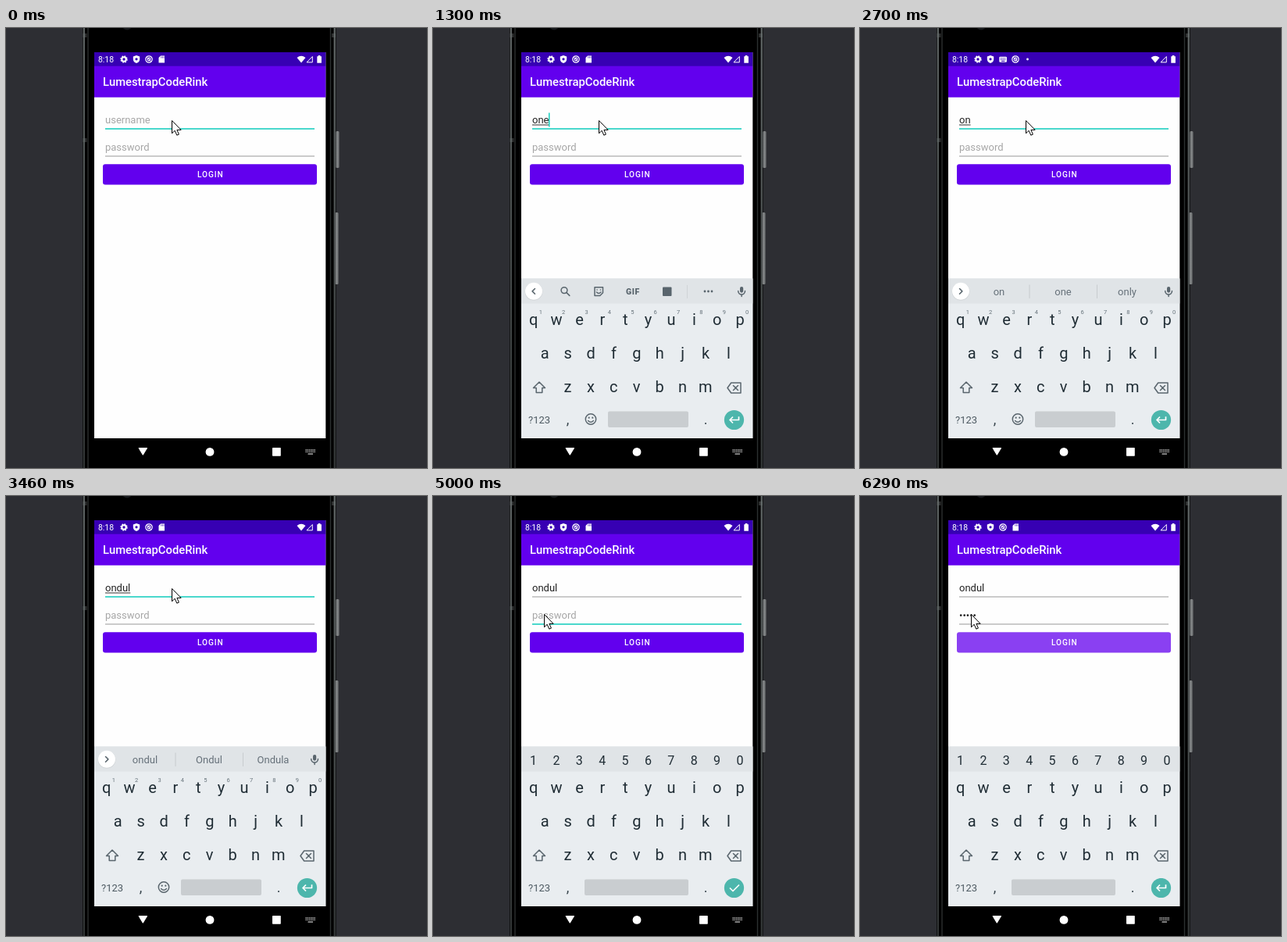
An HTML page that plays this animation: 539x563 px, repeating every 8000 ms.

```html
<!DOCTYPE html>
<html lang="en">
<head>
<meta charset="utf-8">
<title>Login screen</title>
<style>
  html, body { margin: 0; width: 100%; height: 100%; overflow: hidden; background: #2d2e33; }
  svg { display: block; width: 100vw; height: 100vh; }
  text { font-family: Roboto, "Open Sans", sans-serif; white-space: pre; }
  .mid { text-anchor: middle; }
  .field { font-size: 13px; fill: #222; }
  .hint { font-size: 13px; fill: #a6a6a6; }
  .key { font-size: 20px; fill: #202d35; }
  .digit { font-size: 16px; fill: #202d35; }
  .sup { font-size: 7.5px; fill: #66727a; }
  .word { font-size: 13px; fill: #66717a; }
  .line { fill: none; stroke: #59656d; stroke-width: 1.5; stroke-linecap: round; stroke-linejoin: round; }
  .solid { fill: #59656d; }
  .glyph { fill: none; stroke: #fff; stroke-width: 1.7; stroke-linejoin: round; }
</style>
</head>
<body>
<svg viewBox="0 0 539 563" preserveAspectRatio="none">
  <defs>
    <linearGradient id="side">
      <stop offset="0" stop-color="#3c3f41"/><stop offset=".45" stop-color="#8b8e8f"/><stop offset="1" stop-color="#606365"/>
    </linearGradient>
    <linearGradient id="rim" x2="0" y2="1">
      <stop offset="0" stop-color="#626868"/><stop offset=".6" stop-color="#484d4d"/><stop offset="1" stop-color="#343838"/>
    </linearGradient>
    <g id="ring" fill="none" stroke="#fff">
      <circle r="4.2" stroke-width="1.2"/><circle r="1.9" stroke-width="1.1"/><path d="M-2.8-2.8 3 3" stroke-width="1"/>
    </g>
  </defs>

  <!-- Phone body -->
  <rect width="539" height="563" fill="#2d2e33"/>
  <rect x="98" width="324.5" height="563" fill="#000"/>
  <rect x="98.7" width="2.2" height="563" fill="url(#rim)"/>
  <rect x="419.6" width="2.2" height="563" fill="url(#rim)"/>
  <path d="M105 0v563M415.5 0v563" stroke="#2c3030" stroke-width="1.4"/>
  <path d="M98.5 9.5h5M98.5 143.5h5M417 9.5h5" stroke="#686e6e" stroke-width="5" opacity=".45"/>
  <rect x="422" y="132" width="4.7" height="47" rx="1.5" fill="url(#side)"/>
  <rect x="421" y="236" width="4.7" height="92" rx="1.5" fill="url(#side)"/>
  <circle cx="155" cy="-4" r="6.5" fill="#17191c"/>

  <!-- App -->
  <rect x="113" y="31" width="296.3" height="494" fill="#fefefe"/>
  <rect x="113" y="31" width="296.3" height="18" fill="#3700b3"/>
  <rect x="113" y="48.7" width="296.3" height="40" fill="#6200ee"/>
  <g fill="#fff">
    <text x="118" y="44" font-size="10.4">8:18</text>
    <circle cx="151" cy="40" r="2.7" fill="none" stroke="#fff" stroke-width="2"/>
    <circle cx="151" cy="40" r="3.9" fill="none" stroke="#fff" stroke-width="1.6" stroke-dasharray="1.7 1.363"/>
    <path d="M167 35l4.2 1.6V40c0 2.5-1.8 4.3-4.2 5-2.4-.7-4.2-2.5-4.2-5v-3.4z"/>
    <circle cx="167" cy="39.8" r="1.6" fill="#3700b3"/>
    <g id="statusIdle">
      <use href="#ring" x="183" y="40"/>
      <path d="M198 35.5h5v9h-7.5V38z"/><path d="M198.7 36.5v2M200.4 36.5v2M202 36.5v2" stroke="#3700b3" stroke-width=".7"/>
    </g>
    <g id="statusBusy">
      <rect x="178.3" y="36.8" width="9.6" height="7" rx="1"/>
      <path d="M179.8 38.7h7M179.8 40.4h7" stroke="#3700b3" stroke-dasharray="1 .7"/><path d="M181 42.3h4.4" stroke="#3700b3"/>
      <use href="#ring" x="199" y="40"/><circle cx="214.5" cy="40" r="1.4"/>
    </g>
    <path d="M372.5 38Q378 33.5 383.5 38L378 44.5z"/>
    <path d="M392.3 36.5v7.4H385z" fill="none" stroke="#fff"/>
    <path d="M398.3 36.2h1.5V35h2.6v1.2h1.5v8.6h-5.6z"/>
    <text x="124" y="74.3" font-size="14.8" font-weight="500">LumestrapCodeRink</text>
  </g>

  <text class="hint" id="userHint" x="127" y="122">username</text>
  <text class="hint" id="passHint" x="127" y="157">password</text>
  <text class="field" id="userText" x="127" y="122"></text>
  <text class="field" id="passText" x="127" y="157"></text>
  <rect id="compose" x="127" y="123.5" height="1" fill="#333"/>
  <rect id="userLine" x="127" width="268"/>
  <rect id="passLine" x="127" width="268"/>
  <rect id="caret" width="1.5" height="18" fill="#18cdbd"/>
  <rect id="button" x="124" y="174.2" width="274" height="26.4" rx="3"/>
  <text x="245" y="191.1" font-size="10.1" font-weight="500" letter-spacing=".9" fill="#fff">LOGIN</text>

  <!-- Keyboard -->
  <g id="board">
    <rect x="113" y="320.5" width="296.3" height="204.5" fill="#e9edf0"/>
    <rect x="113" y="320.5" width="296.3" height="32" fill="#e0e4e7"/>
    <g id="letters"></g>
    <g id="sups"></g>
    <g id="digits"></g>
    <path class="line" d="M136 453l-7.5 7.5h3.7v6h7.6v-6h3.7z"/>
    <path class="line" d="M381.7 454H394v13h-12.3l-4.7-6.5zM384.5 457.5l6 6m0-6l-6 6"/>
    <text x="122" y="506" font-size="13" fill="#4c5961">?123</text>
    <text class="mid" x="172.5" y="507" font-size="18" fill="#37444c">,</text>
    <text class="mid" x="349" y="507" font-size="18" fill="#37444c">.</text>
    <rect id="space" y="490.5" height="20.5" rx="2" fill="#c9cdd0"/>
    <g id="emoji">
      <circle class="line" cx="202" cy="500.5" r="6.7"/>
      <circle class="solid" cx="199.7" cy="498.7" r="1.1"/><circle class="solid" cx="204.3" cy="498.7" r="1.1"/>
      <path class="line" d="M198.6 502.5q3.4 3.6 6.8 0"/>
    </g>
    <circle cx="385.5" cy="501.5" r="12.6" fill="#4db6ac"/>
    <path id="enter" class="glyph" d="M391.5 497.3v4.2h-11.5m4-4l-4 4 4 4"/>
    <path id="check" class="glyph" d="M380 501.5l4 4 8-8"/>

    <g id="bar">
      <circle cx="129" cy="337.3" r="11.3" fill="#ccd0d3"/><circle cx="129" cy="336.8" r="11" fill="#fff"/>
      <path id="chevron" class="line"/>
      <rect class="solid" x="393" y="331" width="4.2" height="7.7" rx="2.1"/>
      <path class="line" d="M390.7 336.6a4.4 4.4 0 0 0 8.8 0M395.1 341.2v2.3" stroke-linecap="butt"/>
    </g>
    <g id="tools">
      <circle class="line" cx="168" cy="335.6" r="3.9"/><path class="line" d="M171 338.6l3.8 3.8"/>
      <path class="line" d="M207 331.8h10.5v7l-3.7 3.7H207z"/>
      <path class="line" d="M209.5 338q2.7 2.8 5.4 0M210 335h.1M214.4 335h.1"/>
      <text class="mid solid" x="256" y="341" font-size="10.5" font-weight="900" letter-spacing=".6">GIF</text>
      <rect class="solid" x="294" y="331.5" width="11.5" height="11.5" rx="1"/>
      <path d="M325.5 329v17" stroke="#d0d4d7"/>
      <g class="solid"><circle cx="348" cy="337" r="1.4"/><circle cx="352.5" cy="337" r="1.4"/><circle cx="357" cy="337" r="1.4"/></g>
    </g>
    <g id="suggest">
      <path d="M217 328.5v17.5M303.5 328.5v17.5" stroke="#c7cbce"/>
      <text class="word mid" x="178" y="342"></text>
      <text class="word mid" x="260" y="342"></text>
      <text class="word mid" x="342" y="342"></text>
    </g>
  </g>

  <!-- Navigation bar -->
  <g fill="#fff">
    <path d="M170 537.5h10.6l-5.3 8.8z" stroke="#fff" stroke-linejoin="round"/>
    <circle cx="261" cy="542.4" r="5.4"/>
    <rect x="341" y="537" width="10.8" height="10.8" rx=".7"/>
    <path d="M383.5 540h12.5M383.5 542.3h12.5" stroke="#c8c8c8" stroke-width="1.3" stroke-dasharray="1.4 .8"/>
    <path d="M386.5 545h6.5" stroke="#c8c8c8" stroke-width="1.3"/>
  </g>
  <path id="pointer" d="M0 0v16.3l3.7-3.5 2.6 5.9 2.6-1.1-2.5-5.7h5.2z" fill="#fff" stroke="#000"/>
</svg>

<script>
const LOOP = 8000;
const el = id => document.getElementById(id);
const show = (id, on) => el(id).setAttribute('display', on ? 'inline' : 'none');
const set = (id, attrs) => Object.entries(attrs).forEach(([k, v]) => el(id).setAttribute(k, v));

function addRow(parent, chars, x, y, cls) {
  [...chars].forEach((char, i) => {
    const text = document.createElementNS('http://www.w3.org/2000/svg', 'text');
    text.setAttribute('class', cls + ' mid');
    text.setAttribute('x', x + i * 29.38);
    text.setAttribute('y', y);
    text.textContent = char;
    el(parent).append(text);
  });
}
addRow('letters', 'qwertyuiop', 128.7, 380, 'key');
addRow('letters', 'asdfghjkl', 143.3, 423, 'key');
addRow('letters', 'zxcvbnm', 172.5, 466, 'key');
addRow('sups', '1234567890', 137.8, 366, 'sup');
addRow('digits', '1234567890', 128.5, 343.5, 'digit');

// Each entry changes part of the state from its time on.
const timeline = [
  [0, { user: '', pass: '', focus: 'user', caret: false, board: 'none', words: [],
        busy: false, check: false, pressed: false, tip: [212.5, 118.5] }],
  [260, { caret: true }],
  [760, { caret: false }],
  [1300, { user: 'one', caret: true, board: 'tools' }],
  [1790, { caret: false }],
  [2070, { user: 'on', caret: true }],
  [2440, { board: 'suggest', words: ['on', 'one', 'only'], busy: true }],
  [2580, { caret: false }],
  [2830, { user: 'ondu', caret: true, words: ['ondu', 'Ondul', 'Ondula'] }],
  [2950, { user: 'ondul', words: ['ondul', 'Ondul', 'Ondula'], busy: false }],
  [3460, { caret: false }],
  [3710, { tip: [212.5, 120.5] }],
  [3830, { tip: [212.5, 122.5] }],
  [3970, { tip: [192.5, 136.5], caret: true }],
  [4090, { tip: [152.5, 151.5] }],
  [4210, { tip: [130.5, 154.5] }],
  [4330, { tip: [142.5, 151.5] }],
  [4480, { focus: 'pass' }],
  [4610, { board: 'digits' }],
  [4730, { check: true }],
  [5000, { caret: false }],
  [5250, { pass: 'k', caret: true }],
  [5370, { pass: '•o' }],
  [5510, { pass: '•••e' }],
  [5650, { pass: '•••••' }],
  [6150, { focus: '', caret: false, check: false, pressed: true }]
];

function draw(s) {
  const top = { user: 108, pass: 143 };
  for (const name of ['user', 'pass']) {
    const focused = s.focus === name;
    const thick = focused ? 1.6 : 1;
    el(name + 'Text').textContent = s[name];
    show(name + 'Hint', !s[name]);
    set(name + 'Line', { y: top[name] + 21 - thick / 2, height: thick, fill: focused ? '#1fcfc0' : '#999' });
  }
  const width = name => s[name] ? el(name + 'Text').getComputedTextLength() : 0;
  set('compose', { width: s.focus === 'user' ? width('user') : 0 });
  show('caret', s.caret);
  if (s.focus) set('caret', { x: 126.5 + width(s.focus), y: top[s.focus] + .5 });
  set('button', { fill: s.pressed ? '#8a40f2' : '#6200ee' });

  const secret = s.board === 'digits';
  show('board', s.board !== 'none');
  for (const id of ['tools', 'suggest', 'digits']) show(id, s.board === id);
  for (const id of ['bar', 'sups', 'emoji']) show(id, !secret);
  set('chevron', { d: s.board === 'suggest' ? 'M127.5 333.5l3.4 3.4-3.4 3.4' : 'M130.5 333.5l-3.4 3.4 3.4 3.4' });
  set('space', { x: secret ? 194 : 224, width: secret ? 133 : 103 });
  show('check', s.check);
  show('enter', !s.check);
  document.querySelectorAll('.word').forEach((word, i) => word.textContent = s.words[i] || '');

  show('statusIdle', !s.busy);
  show('statusBusy', s.busy);
  set('pointer', { transform: `translate(${s.tip})` });
}

let drawn = 0;
const start = performance.now();
function tick() {
  const time = (performance.now() - start) % LOOP;
  const past = timeline.filter(([at]) => at <= time);
  if (past.length !== drawn) {
    drawn = past.length;
    draw(Object.assign({}, ...past.map(([, change]) => change)));
  }
  requestAnimationFrame(tick);
}
tick();
</script>
</body>
</html>
```
